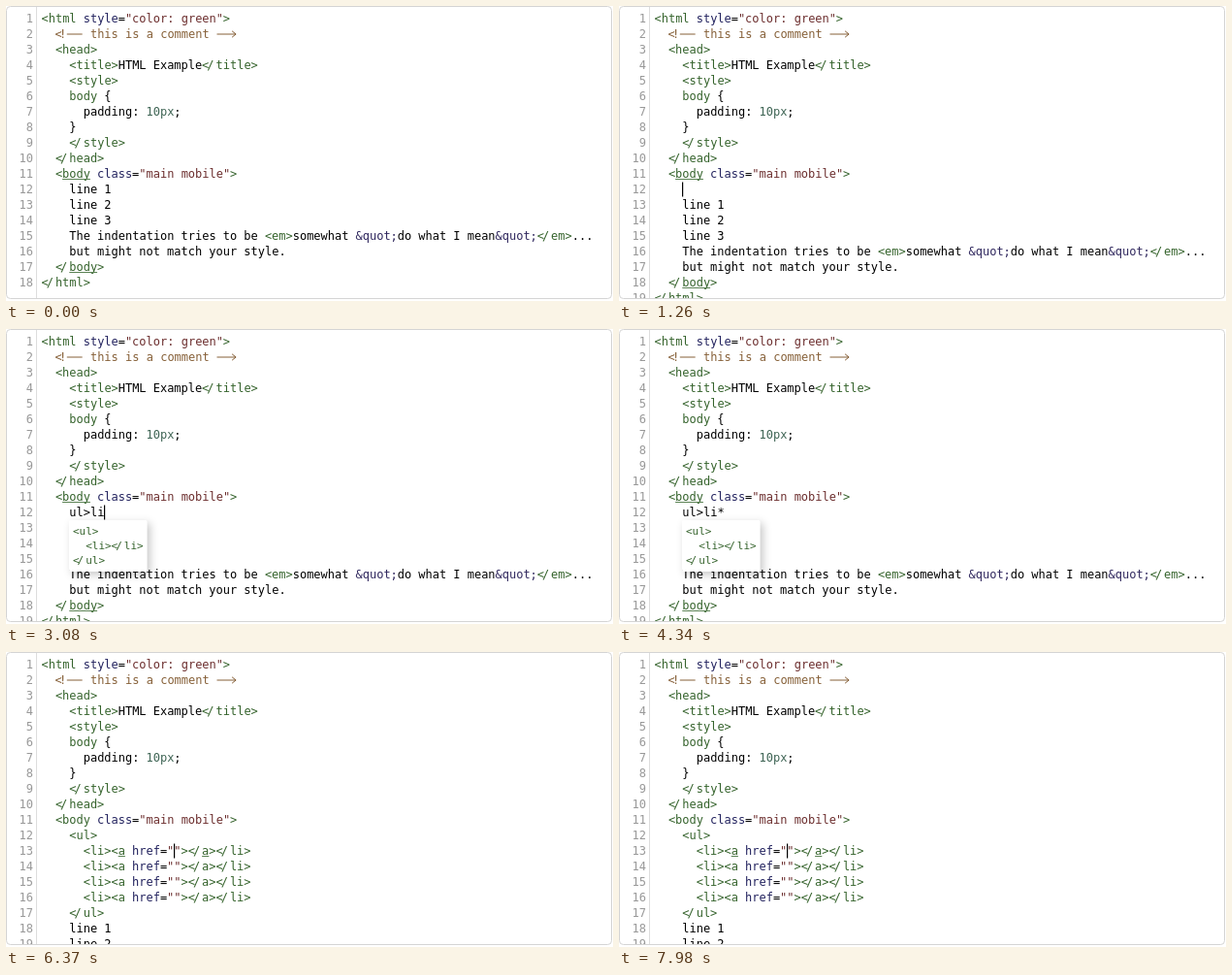
Animation, 626 px wide and 304 px high, one loop 8.05 s. Source, as an HTML page:

```html
<!DOCTYPE html>
<html lang="en">
<head>
<meta charset="utf-8">
<title>Abbreviation expansion in a code editor</title>
<style>
  html, body { margin: 0; width: 100%; height: 100%; overflow: hidden; background: #fff; }
  svg { display: block; width: 626px; height: 304px; }
  text { font-family: "DejaVu Sans Mono", "Noto Sans Mono", monospace; font-variant-ligatures: none; white-space: pre; fill: #000; }
  .num { fill: #999; text-anchor: end; }
  .tag { fill: #35632c; }
  .attr { fill: #22225e; }
  .str { fill: #6c2e2e; }
  .note { fill: #866038; }
  .unit { fill: #3e6454; }
  .atom { fill: #30285e; }
  .rule { stroke: #5c8355; }
  .lig { stroke: #866038; fill: none; }
  .box { fill: #fff; filter: drop-shadow(3px 3px 4px rgba(0, 0, 0, .22)); }
</style>
</head>
<body>
<svg viewBox="0 0 626 304">
  <clipPath id="view"><rect x="1" y="1" width="623" height="300"/></clipPath>
  <g clip-path="url(#view)">
    <path d="M31.5 1V301" stroke="#ddd"/>
    <g id="code"></g>
    <rect id="cursor" width="1.2" height="15"/>
    <g id="popup"></g>
  </g>
  <rect x=".5" y=".5" width="624" height="301" rx="4" fill="none" stroke="#d4d4d4"/>
</svg>
<script>
const LOOP = 8050, BLINK = 1200;
const LEFT = 36.5, TOP = 17, ROW = 16, SIZE = 12;
const $ = id => document.getElementById(id);
const code = $("code"), cursor = $("cursor"), popup = $("popup");

const head = `<html style="color: green">
  <!-- this is a comment -->
  <head>
    <title>HTML Example</title>
    <style>
    body {
      padding: 10px;
    }
    </style>
  </head>
  <body class="main mobile">`.split("\n");
const tail = `    line 1
    line 2
    line 3
    The indentation tries to be <em>somewhat &quot;do what I mean&quot;</em>...
    but might not match your style.
  </body>
</html>`.split("\n");

const list = (n, inner) => ["<ul>", ...Array(n).fill(`  <li>${inner}</li>`), "</ul>"];
const link = '<a href=""></a>';

// Each edit: time, typed text, preview lines
const edits = [
  [-430, null],
  [980, ""],
  [1890, "u"],
  [2030, "ul"],
  [2380, "ul>", ["<ul></ul>"]],
  [2660, "ul>l", ["<ul>", "  <l></l>", "</ul>"]],
  [2940, "ul>li", list(1, "")],
  [3500, "ul>li*", list(1, "")],
  [4690, "ul>li*4", list(4, "")],
  [5040, "ul>li*4>", list(4, "")],
  [5110, "ul>li*4>a", list(4, link)],
  [6230, "done"]
];

const escape = s => s.replace(/&/g, "&amp;").replace(/</g, "&lt;").replace(/>/g, "&gt;");
const span = (x, y, size, kind, s) =>
  `<text x="${x}" y="${y}" font-size="${size}" class="${kind}">${escape(s)}</text>`;

const TOKEN = /<!--.*-->|<\/|<|>|"[^"]*"|&\w+;|\d+px|\w+(?==")|[^<>"&\s]+|\s+/g;

function comment(s, x, y, size) {
  const w = size * .6, end = x + s.length * w, mid = y - 4;
  return span(x - .5, y, size, "note", "<") + span(x + w - 3, y, size, "note", "!") +
    span(x + 4 * w, y, size, "note", s.slice(4, -3)) +
    `<path class="lig" d="M${x + 2 * w - 2.5} ${mid}H${x + 4 * w - 1}` +
    `M${end - 3 * w + 1} ${mid}H${end - 1}m-4 -3.2l4 3.2l-4 3.2"/>`;
}

function drawLine(line, x0, y, size, mark) {
  const w = size * .6;
  let out = "", last = "";
  for (const m of line.matchAll(TOKEN)) {
    const s = m[0], x = x0 + m.index * w;
    const name = last === "<" || last === "</";
    const selector = line.startsWith(" {", m.index + s.length);
    last = s;
    if (!s.trim()) continue;
    if (s.startsWith("<!--")) { out += comment(s, x, y, size); continue; }
    if (s === "</") {
      out += span(x, y, size, "tag", "<") + span(x + w - 2, y, size, "tag", "/");
      continue;
    }
    const kind = name || selector || s === "<" || s === ">" ? "tag"
      : s[0] === '"' ? "str"
      : s[0] === "&" ? "atom"
      : /^\d+px$/.test(s) ? "unit"
      : line.startsWith('="', m.index + s.length) ? "attr" : "";
    out += span(x, y, size, kind, s);
    if (name && s === mark)
      out += `<path class="rule" d="M${x} ${y + 1.5}h${s.length * w}"/>`;
  }
  return out;
}

function drawEdit([, typed, preview]) {
  const done = typed === "done";
  const middle = done ? list(4, link).map(s => "    " + s)
    : typed === null ? [] : ["    " + typed];
  const lines = [...head, ...middle, ...tail].slice(0, 19);

  code.innerHTML = lines.map((line, i) => {
    const y = TOP + i * ROW;
    const mark = done ? (i === 12 ? "a" : "") : i > 9 ? "body" : "";
    const raw = !done && typed !== null && i === 11;
    return span(28, y, SIZE, "num", String(i + 1)) +
      (raw ? span(LEFT + 28.8, y, SIZE, "", typed) : drawLine(line, LEFT, y, SIZE, mark));
  }).join("");

  const [row, col] = done ? [12, 19] : typed === null ? [10, 28] : [11, 4 + typed.length];
  cursor.setAttribute("x", LEFT + col * 7.2 - .3);
  cursor.setAttribute("y", TOP + row * ROW - 11.5);

  popup.innerHTML = "";
  if (preview) {
    const width = Math.max(...preview.map(s => s.length)) * 6.6 + 8;
    popup.innerHTML =
      `<rect class="box" x="65" y="197" width="${width}" height="${preview.length * 15 + 8}" rx="2"/>` +
      preview.map((s, i) => drawLine(s, 69, 212 + i * 15, 11)).join("");
  }
}

let shown;
function render(t) {
  const edit = edits.findLast(e => e[0] <= t);
  if (edit !== shown) drawEdit(shown = edit);
  const visible = t >= 770 && (t - edit[0]) % BLINK < BLINK / 2;
  cursor.style.display = visible ? "" : "none";
}

const start = performance.now();
function tick() {
  render((performance.now() - start) % LOOP);
  requestAnimationFrame(tick);
}
tick();
</script>
</body>
</html>
```
